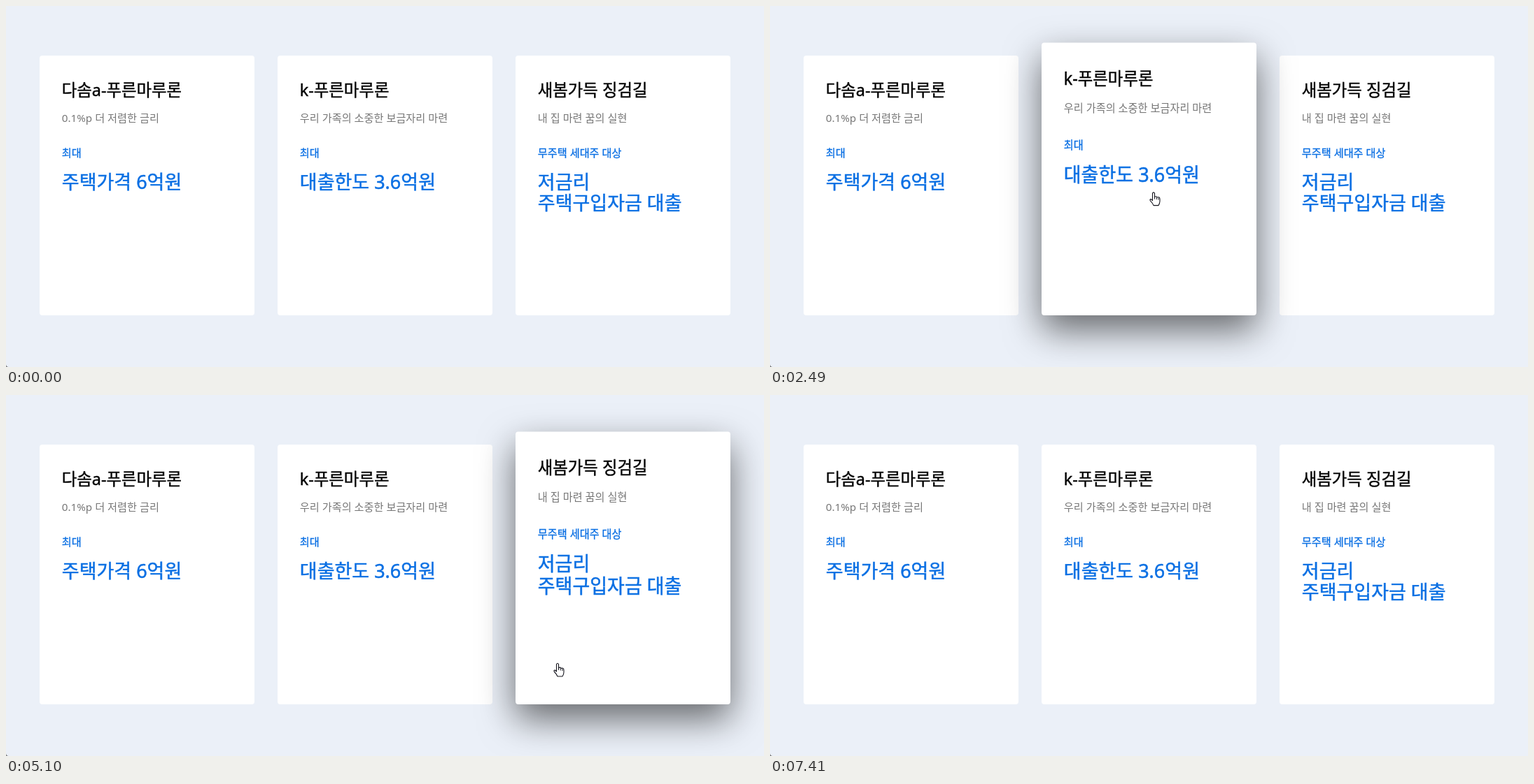
These frames come from a looping animation (1083 by 517 pixels, 7.89 s). An HTML page:

```html
<!DOCTYPE html>
<html lang="ko">
<head>
<meta charset="utf-8">
<title>대출 상품 카드</title>
<style>
html, body { margin: 0; width: 100%; height: 100%; overflow: hidden; background: #ebf0f8; }
.card {
  position: absolute; top: 71px; width: 307px; height: 372px;
  background: #fff; border-radius: 4px; transform-origin: 50% 100%;
}
.card.on { z-index: 1; box-shadow: 0 20px 50px rgba(0,0,0,.57); }
svg { position: absolute; left: 0; top: 0; overflow: visible; }
text { font-family: "Noto Sans", "Noto Sans CJK KR", sans-serif; }
.name { font-size: 23.4px; stroke: #000; stroke-width: .4px; }
.note { font-size: 15.2px; font-weight: 300; fill: #777; }
.label, .main { fill: #0a6fe3; stroke: #0a6fe3; }
.label { font-size: 15.2px; stroke-width: .3px; }
.main { font-size: 27px; stroke-width: .5px; }
#hand { z-index: 2; }
#corner {
  position: absolute; left: 0; bottom: 0; width: 4px; height: 4px;
  background: radial-gradient(circle at 100% 0, transparent 3.5px, #777 4.5px);
}
</style>
</head>
<body>
<div id="corner"></div>
<svg id="hand" width="16" height="22">
  <path fill="#fff" stroke="#16161e" stroke-width="1.1" stroke-linejoin="round"
    d="M-1.5 12V1.5Q0 -1 1.5 1.5V7Q4 5 5 7.5Q9 6 9 10V13Q9 16 7 19H0Q-1 16 -4.5 12.5Q-6 10 -3.6 10Z"/>
  <path fill="none" stroke="#16161e" d="M1.5 7v3m2.8 -2.5v3m2.7 -2.5v3"/>
</svg>
<script>
const LOOP = 7890, STEP = 30, FADE = 500, GROW = .05;

const products = [
  { name: '다솜a-푸른마루론', note: '0.1%p 더 저렴한 금리', label: '최대', main: ['주택가격 6억원'] },
  { name: 'k-푸른마루론', note: '우리 가족의 소중한 보금자리 마련', label: '최대', main: ['대출한도 3.6억원'] },
  { name: '새봄가득 징검길', note: '내 집 마련 꿈의 실현', label: '무주택 세대주 대상', main: ['저금리', '주택구입자금 대출'] }
];

// The pointer eases from spot to spot while it stays on a card.
const visits = [
  { card: 0, enter: 750, leave: 1560, spots: [[159, 160], [159, 168], [345, 180]] },
  { card: 1, enter: 1680, leave: 2960, spots: [[392, 185], [515, 186], [549, 269], [692, 205]] },
  { card: 2, enter: 3375, leave: 5290, spots: [[853, 298], [878, 318], [852, 360], [815, 409], [788, 384], [788, 384]] },
  { card: 0, enter: 5440, leave: 6175, spots: [[175, 416], [83, 403], [84, 342], [90, 436]] },
  { card: 1, enter: 6330, leave: 6930, spots: [[505, 409], [536, 349], [566, 427]] }
];

const row = (kind, y, line) => `<text class="${kind}" x="31.8" y="${y}">${line}</text>`;

const cards = products.map(({ name, note, label, main }, i) => {
  const card = document.createElement('div');
  card.className = 'card';
  card.style.left = 48 + 340 * i + 'px';
  card.innerHTML = '<svg width="307" height="372">' +
    row('name', 58, name) + row('note', 95, note) + row('label', 145, label) +
    main.map((line, j) => row('main', 190.5 + 30 * j, line)).join('') + '</svg>';
  document.body.append(card);
  return card;
});
const hand = document.getElementById('hand');

const clamp = x => Math.min(1, Math.max(0, x));
const smooth = x => x * x * (3 - 2 * x);

// CSS "ease": its curve has x = .75s(1-s) + s^3 and y = .3s(1-s)^2 + 3s^2(1-s) + s^3
function ease(time) {
  const x = clamp(time);
  let s = .5;
  for (let size = .25; size > 1e-5; size /= 2) {
    s += .75 * s * (1 - s) + s ** 3 < x ? size : -size;
  }
  return .3 * s * (1 - s) ** 2 + 3 * s * s * (1 - s) + s ** 3;
}

function moveHand({ enter, leave, spots }, t) {
  const u = (t - enter) / (leave - enter) * (spots.length - 1);
  const i = Math.floor(u), k = smooth(u - i);
  const [x, y] = spots[i].map((from, axis) => from + (spots[i + 1][axis] - from) * k);
  hand.style.transform = `translate(${x}px, ${y}px)`;
}

function draw(now) {
  const loopTime = now % LOOP, t = loopTime - loopTime % STEP;
  const current = visits.find(v => t >= v.enter && t < v.leave);
  cards.forEach((card, i) => {
    let lift = 0;
    for (const v of visits) {
      if (v.card === i) lift += ease((t - v.enter) / FADE) - ease((t - v.leave) / FADE);
    }
    card.classList.toggle('on', current?.card === i);
    card.style.transform = lift > .001 ? `scaleY(${1 + GROW * lift})` : 'none';
  });
  hand.style.display = current ? 'block' : 'none';
  if (current) moveHand(current, t);
  requestAnimationFrame(draw);
}
requestAnimationFrame(draw);
</script>
</body>
</html>
```
